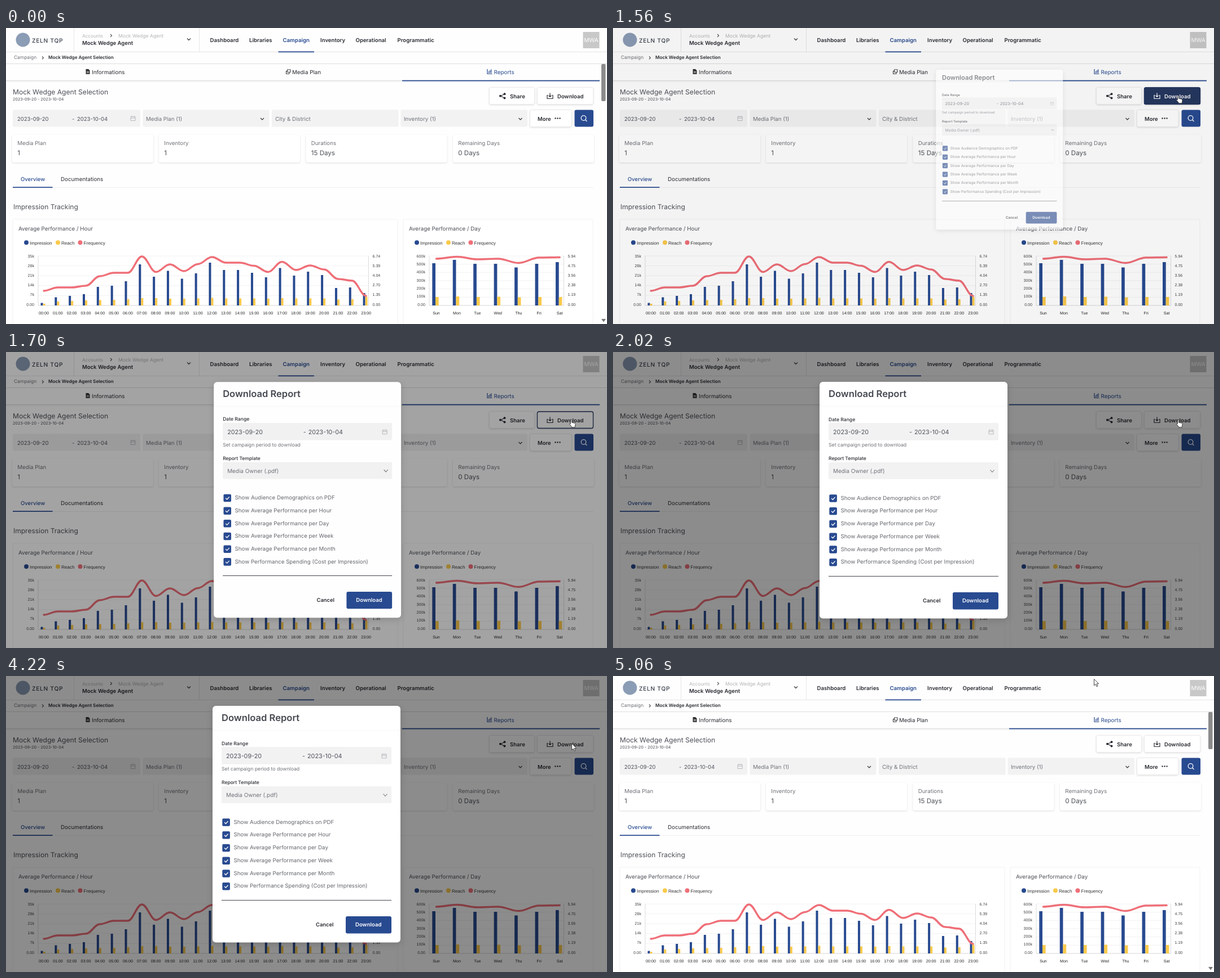
An HTML page for the animation above (5100 ms loop, 1065x526 px).

```html
<!DOCTYPE html>
<html lang="en">
<head>
<meta charset="utf-8">
<title>Campaign report</title>
<style>
  html, body { margin: 0; width: 100%; height: 100%; overflow: hidden; background: #fff; }
  svg { display: block; width: 100vw; height: 100vh; }
  text { font-family: Inter, "Open Sans", sans-serif; text-rendering: geometricPrecision; white-space: pre; }
  .chart text { font-family: "Liberation Sans", Arial, sans-serif; }
  .soft { filter: drop-shadow(0 1.5px 1.5px rgba(0, 0, 0, .13)); }
</style>
</head>
<body>
<svg id="stage" viewBox="0 0 1065 526" xmlns="http://www.w3.org/2000/svg"></svg>
<script>
const BLUE = '#284a90', DARK = '#24355e', YELLOW = '#fbca4c', RED = '#ef6f78';
const INK = '#2a2c33', GREY = '#6f7178', MID = '#4d5058', FIELD = '#f2f2f3';
const OWNER = 'Mock Wedge Agent', CAMPAIGN = OWNER + ' Selection';
const LOOP = 5100, CLICK = { x: 1002, y: 118 };

// Shape helpers
const text = (x, y, str, size, fill = INK, weight = 400, anchor = 'start') =>
  `<text x="${x}" y="${y}" font-size="${size}" fill="${fill}" font-weight="${weight}" text-anchor="${anchor}">${str}</text>`;
const rect = (x, y, w, h, fill, r = 0, extra = '') =>
  `<rect x="${x}" y="${y}" width="${w}" height="${h}" rx="${r}" fill="${fill}" ${extra}/>`;
const dot = (x, y, r, fill) => `<circle cx="${x}" cy="${y}" r="${r}" fill="${fill}"/>`;
const stroke = (d, color, width = 1, extra = '') =>
  `<path d="${d}" fill="none" stroke="${color}" stroke-width="${width}" ${extra}/>`;
const chevronDown = (x, y, color = '#444') => stroke(`M${x - 3} ${y - 1.5}l3 3l3-3`, color, 1.3);
const chevronRight = (x, y) => stroke(`M${x - 1} ${y - 2.5}l2.5 2.5l-2.5 2.5`, '#555', 1.1);
const calendar = (x, y) =>
  stroke(`M${x - 4} ${y - 3}h8v7h-8zM${x - 4} ${y - .5}h8M${x - 2} ${y - 4.5}v2M${x + 2} ${y - 4.5}v2`, '#b4b4b8', .9);
const card = (x, y, w, h) => rect(x, y, w, h, '#fff', 3, 'class="soft"');

const downloadLabel = color =>
  stroke('M960.5 119.5h-1.5v6h10v-6h-1.5M964 115.5v6.5M961.7 120l2.3 2.3l2.3-2.3', color, 1.2) +
  text(977, 124.5, 'Download', 9.6, color, 600);

function header() {
  const nav = [[361.5, 'Dashboard'], [431, 'Libraries'], [490.5, 'Campaign'], [557, 'Inventory'],
    [619.5, 'Operational'], [693.5, 'Programmatic']];
  return rect(0, 42, 1065, 1, '#e6e6e8') + rect(120, 0, 1, 42, '#e6e6e8') + rect(342, 0, 1, 42, '#e6e6e8') +
    dot(30, 21, 12.5, '#8b9cb5') +
    `<g letter-spacing=".7">${text(46, 25.5, 'ZELN TQP', 10.2, '#363d4a', 500)}</g>` +
    text(135, 17, 'Accounts', 8.3, '#b4b4b8') + chevronRight(186, 13.5) +
    text(199, 17, OWNER, 8.6, '#b4b4b8') + text(135, 30, OWNER, 9.5, INK, 600) + chevronDown(324, 20) +
    nav.map(([x, s]) => text(x, 24.5, s, 9.65, s === 'Campaign' ? BLUE : INK, 600)).join('') +
    rect(482.5, 41.5, 63.5, 1.8, BLUE) +
    rect(1022.5, 7, 29, 29, '#c8c8c8') + text(1037, 25, 'MWA', 10, '#fff', 400, 'middle') +
    text(14, 55, 'Campaign', 8.4, GREY) + chevronRight(65, 53) + text(75, 55, CAMPAIGN, 8.15, INK, 600) +
    rect(0, 63, 1065, 1, '#dedee0');
}

function tabs() {
  return rect(0, 93, 1052, 1.2, '#dcdcde') + rect(0, 94.2, 1052, 2, '#f5f5f6') + rect(702, 92.7, 350, 1.8, BLUE) +
    '<path d="M141.5 73h4.5l2.500 2.500v6.500h-7z" fill="#333"/>' + stroke('M143 77.500h4M143 79.500h4', '#fff', .8) +
    text(152, 82, 'Informations', 9.9) +
    stroke('M498.500 74h5.500v4.500h-5.500zM498.500 76.500h-2v5h5.500v-3', '#444', 1.1) + text(507, 82, 'Media Plan', 9.8) +
    stroke('M853 73v8.500h8.500M855.500 80v-3M857.700 80v-5M859.900 80v-6.500', BLUE, 1.2) + text(864.5, 82, 'Reports', 9.9, BLUE);
}

function toolbar() {
  const buttonBox = (x, y, w) => rect(x, y, w, 30, '#fff', 3, 'stroke="#ebebed" class="soft"');
  return text(12, 118, CAMPAIGN, 12.1, MID) + text(12, 129, '2023-09-20 - 2023-10-04', 7.2, MID) +
    buttonBox(856.5, 105.5, 80) +
    stroke('M883.5 117.5l-7 3.300l7 3.700', INK, 1.1) + dot(883.5, 117.2, 2, INK) + dot(876, 120.8, 2, INK) + dot(883.5, 124.5, 2, INK) +
    text(893, 124.5, 'Share', 9.6, INK, 600) +
    buttonBox(941.5, 105.5, 99) + downloadLabel(INK) +
    `<g id="hover">${rect(941, 105.5, 100, 30.5, BLUE, 3)}${rect(941, 105.5, 100, 30.5, DARK, 3, 'id="pressed"')}${downloadLabel('#fff')}</g>` +
    rect(941.5, 106, 99, 29.5, 'none', 3, `id="focus" stroke="${DARK}" stroke-width="1.3"`) +
    [[12, 226], [242.5, 224], [471, 224.5], [699.5, 224.5]].map(([x, w]) => rect(x, 145.5, w, 30, FIELD, 2)).join('') +
    text(20, 164.5, '2023-09-20', 9.5, MID) + text(117, 164.5, '-', 9.5, MID) + text(126, 164.5, '2023-10-04', 9.5, MID) + calendar(225, 160.5) +
    text(248, 164.5, 'Media Plan (1)', 9.7, GREY) + chevronDown(454, 161.5) +
    text(477, 164.5, 'City &amp; District', 9.75, GREY) +
    text(705, 164.5, 'Inventory (1)', 9.75, GREY) + chevronDown(911.5, 161.5) +
    buttonBox(928.5, 145.5, 73.5) + text(942, 164.5, 'More', 9.5, INK, 600) +
    [973.5, 977.5, 981.5].map(x => dot(x, 160.5, 1.2, INK)).join('') +
    rect(1007.5, 145.5, 33.5, 30, BLUE, 3) + stroke('M1026.600 163.200l2.800 2.800', '#fff', 1.3) +
    '<circle cx="1023.5" cy="160" r="4.300" fill="none" stroke="#fff" stroke-width="1.300"/>';
}

function summary() {
  const cards = [[11, 'Media Plan', '1'], [271, 'Inventory', '1'], [531.5, 'Durations', '15 Days'], [792, 'Remaining Days', '0 Days']];
  return cards.map(([x, label, value]) => card(x, 190, 250, 49) +
      text(x + 9.3, 207.5, label, 9.75, GREY) + text(x + 9.3, 226, value, 11.6, MID)).join('') +
    text(26, 271.5, 'Overview', 9.5, BLUE, 500) + text(97, 271.5, 'Documentations', 9.75) +
    rect(12, 283, 1029, 1, '#efeff0') + rect(12, 282.3, 70.5, 1.7, BLUE) +
    text(13, 322, 'Impression Tracking', 12, MID);
}

// A bar pair per category, with a smoothed line above
function chart(c) {
  const base = 493, top = 405, height = 86;
  const at = i => c.first + c.step * i;
  const scale = (labels, x, anchor) => labels.map((s, i) =>
    text(x, top + 2.5 + i * height / (labels.length - 1), s, 7.1, '#444', 400, anchor)).join('');
  const grid = c.left.map((_, i) => `M${c.x0} ${top + i * (base - top) / (c.left.length - 1)}H${c.x1}`).join('');
  const bars = (tops, dx, fill) => tops.map((y, i) =>
    rect(at(i) + dx, y, c.bar, base - y, fill)).join('');
  const line = c.line.map((y, i) => i
    ? `C${at(i - 1) + c.step * .38} ${c.line[i - 1]} ${at(i) - c.step * .38} ${y} ${at(i)} ${y}`
    : `M${at(0)} ${y}`).join('');
  const legend = [[0, 'Impression', BLUE], [56, 'Reach', YELLOW], [95.5, 'Frequency', RED]];
  return rect(c.x, 340, c.w, 200, '#fff', 2, 'stroke="#f1f1f2"') + text(c.x + 10, 359.5, c.title, 9.75, MID) +
    '<g class="chart">' +
    legend.map(([dx, s, fill]) => dot(c.x + 24 + dx, 381.3, 4, fill) + text(c.x + 30 + dx, 385, s, 8.1, '#333')).join('') +
    stroke(grid, '#eeeeef', .8) + stroke(`M${c.x0} ${top}V${base}H${c.x1}V${top}`, '#d9d9dc', .9) +
    scale(c.left, c.x0 - 7, 'end') + scale(c.right, c.x1 + 7, 'start') +
    bars(c.impressions, -1.5 - c.bar, BLUE) + bars(c.reach, -1.5, YELLOW) +
    stroke(line, RED, 3.4, 'stroke-linecap="round"') +
    c.names.map((s, i) => text(at(i), 509, s, 7.1, '#222', 500, 'middle')).join('') + '</g>';
}

const hourly = chart({
  x: 12, w: 682, x0: 57, x1: 642.5, first: 67, step: 24.83, bar: 4, title: 'Average Performance / Hour',
  left: ['35k', '28k', '21k', '14k', '7k', '0.00'], right: ['6.74', '5.39', '4.04', '2.70', '1.35', '0.00'],
  names: Array.from({ length: 24 }, (_, i) => String(i).padStart(2, '0') + ':00'),
  impressions: [488.5, 478.5, 476, 473, 460, 458, 450, 420, 442, 431.5, 445.5, 436, 417, 430, 430, 435, 443, 426.5, 440, 433, 439, 462, 461, 471],
  reach: [490, 486, 485, 484, 483.5, 483, 482, 480, 480, 481, 481, 480.5, 479.5, 480.5, 480.5, 480.5, 481, 480, 480.5, 480.5, 480.5, 482.5, 482, 477.5],
  line: [467, 461, 461, 458, 441, 435, 435, 406, 433.5, 420, 432, 419.5, 407, 417, 417, 422.5, 433.5, 415.5, 430, 422, 429, 446, 449, 476]
});
const daily = chart({
  x: 704, w: 336, x0: 750, x1: 988.5, first: 762.5, step: 36.45, bar: 5.7, title: 'Average Performance / Day',
  left: ['600k', '500k', '400k', '300k', '200k', '100k', '0.00'], right: ['5.94', '4.75', '3.56', '2.38', '1.19', '0.00'],
  names: ['Sun', 'Mon', 'Tue', 'Wed', 'Thu', 'Fri', 'Sat'],
  impressions: [418, 412, 419, 419, 425.5, 419, 416],
  reach: [478, 477, 478, 477.5, 478.5, 478, 478],
  line: [410, 406.5, 411, 410, 417.5, 408, 407.5]
});

function dialog() {
  const options = ['Audience Demographics on PDF', 'Average Performance per Hour', 'Average Performance per Day',
    'Average Performance per Week', 'Average Performance per Month', 'Performance Spending (Cost per Impression)'];
  return rect(366, 53, 333, 420.5, '#fff', 6, 'style="filter:drop-shadow(0 3px 6px rgba(0,0,0,.15))"') +
    text(382, 80, 'Download Report', 16.6, '#454850', 600) + rect(366, 96, 333, .8, '#f6f6f7') +
    text(382, 122.5, 'Date Range', 8.6, INK, 500) + rect(382, 126, 301, 31, FIELD, 2) +
    text(390, 145.7, '2023-09-20', 10.8, MID) + text(525, 145.7, '-', 10.8, MID) + text(534, 145.7, '2023-10-04', 10.8, MID) + calendar(670, 142) +
    text(382, 168, 'Set campaign period to download', 8.7, GREY) +
    text(382, 192, 'Report Template', 8.5, INK, 500) + rect(382, 196, 301, 30, FIELD, 2) +
    text(390, 215, 'Media Owner (.pdf)', 9.95, GREY) + stroke('M668.500 209.500l3.500 4l3.500-4', '#777', 1.1) +
    options.map((s, i) => {
      const y = 260 + i * 22.75;
      return rect(383.3, y - 6.8, 13.6, 13.6, BLUE, 2) + stroke(`M387 ${y}l2.500 2.500l4-4.500`, '#fff', 1.3) +
        text(403.5, y + 2.7, 'Show ' + s, 9.75, '#65676e');
    }).join('') +
    rect(382, 398, 301, 1, '#44464c') + text(549, 445, 'Cancel', 9.4, INK, 600) +
    rect(602, 427, 81, 30.5, BLUE, 3) + text(619, 445, 'Download', 9.6, '#fff', 600);
}

const pointer = `<g stroke="#333" stroke-width=".9" stroke-linejoin="round" fill="#fff">
  <path id="arrow" d="M0 0v11.500l2.700-2.500l1.900 4.300l1.900-.8l-1.900-4.200h3.700z"/>
  <path id="hand" d="M-2 .8q1.200-1.300 2.200 0v4.500l4.800 1q1.700.5 1.500 2.300l-.7 3.400v1.800h-6l-.2-1.500l-3.800-4.300q.2-1.600 2.200-.3z"/></g>`;

const $ = id => document.getElementById(id);
$('stage').innerHTML = rect(0, 0, 1065, 526, '#fefefe') + header() + tabs() + toolbar() + summary() + hourly + daily +
  `<g id="scrollbar">${rect(1055, 64, 7.5, 66, '#8b8b8b', 2)}<path d="M1055 517h8l-4 5.500z" fill="#777"/></g>` +
  rect(0, 0, 1065, 526, '#000', 0, 'id="mask"') + `<g id="dialog">${dialog()}</g><g id="cursor">${pointer}</g>`;

// Timing helpers
const progress = (t, start, duration) => Math.min(1, Math.max(0, (t - start) / duration));
const lerp = (a, b, k) => a + (b - a) * k;
const smooth = k => k * k * (3 - 2 * k);
const bezier = (x1, y1, x2, y2) => x => {
  const curve = (u, a, b) => 3 * u * (1 - u) ** 2 * a + 3 * u * u * (1 - u) * b + u ** 3;
  let low = 0, high = 1;
  for (let i = 0; i < 24; i++) {
    const mid = (low + high) / 2;
    if (curve(mid, x1, x2) < x) low = mid; else high = mid;
  }
  return curve(high, y1, y2);
};
const zoomIn = bezier(.08, .82, .17, 1), zoomOut = bezier(.78, .14, .15, .86);
const OPEN = 1541, CLOSE = 4360, ZOOM = 200;

function render(t) {
  const opening = progress(t, OPEN, ZOOM), closing = progress(t, CLOSE, ZOOM);
  const shown = t < OPEN || closing === 1 ? 0 : closing ? 1 - zoomOut(closing) : zoomIn(opening);
  const size = .2 + .8 * shown;
  $('mask').setAttribute('opacity', .45 * (opening - closing));
  $('dialog').setAttribute('opacity', shown);
  $('dialog').setAttribute('transform', `translate(${CLICK.x} ${CLICK.y}) scale(${size}) translate(${-CLICK.x} ${-CLICK.y})`);
  $('scrollbar').setAttribute('opacity', t < OPEN || closing === 1 ? 1 : 0);

  $('hover').setAttribute('opacity', progress(t, 690, 90) - progress(t, 1560, 100));
  $('pressed').setAttribute('opacity', progress(t, 1360, 140));
  $('focus').setAttribute('opacity', t < OPEN ? 0 : 1 - progress(t, 1950, 70));

  const enter = smooth(progress(t, 280, 500)), leave = smooth(progress(t, 4560, 500));
  const x = lerp(lerp(915, 1002.5, enter), 852.5, leave);
  const y = lerp(lerp(8, 120, enter), 5.5, leave);
  const overButton = t >= 690 && t < 4220;
  $('cursor').setAttribute('transform', `translate(${x} ${y})`);
  $('cursor').setAttribute('opacity', t < 280 ? 0 : 1);
  $('hand').setAttribute('opacity', overButton ? 1 : 0);
  $('arrow').setAttribute('opacity', overButton ? 0 : 1);
}

const begin = performance.now();
function tick() {
  render((performance.now() - begin) % LOOP);
  requestAnimationFrame(tick);
}
tick();
</script>
</body>
</html>
```
